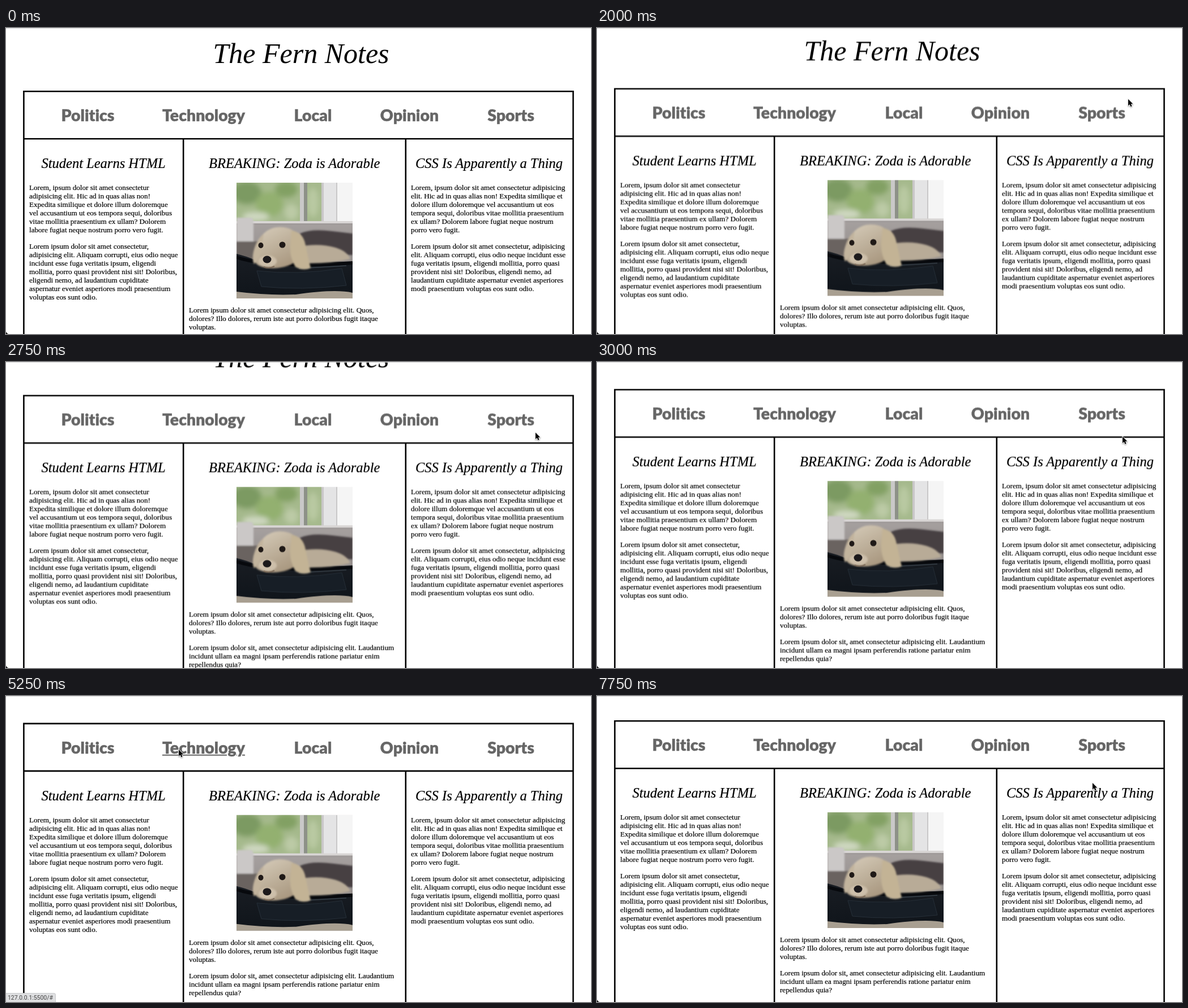
Animation, 1033 px wide and 542 px high, one loop 8000 ms. Source, as an HTML page:

```html
<!DOCTYPE html>
<html lang="en">
<head>
<meta charset="utf-8">
<title>Newspaper page</title>
<style>
html, body { margin: 0; width: 100%; height: 100%; overflow: hidden; background: #fff; }
body { position: relative; color: #000; font: 13.1px/15.1px "Liberation Serif", "Times New Roman", serif; }
#page, #page > *, .cursor, .status, .topline, .corner { position: absolute; }
#page { inset: 0; animation: scroll 8s step-end infinite; }
h1, h2, p { margin: 0; white-space: pre; }
h2, p { -webkit-text-stroke: .2px #000; }

h1 { left: 321px; top: 17px; width: 400px; text-align: center; font: italic 400 50px/56px "Liberation Serif", serif; }
h2 { top: 226px; font: italic 400 24.5px/28px "Liberation Serif", serif; }

.rules { left: 0; top: 0; width: 1033px; height: 700px; fill: none; stroke: #000; stroke-width: 2.6px; }

nav a {
  position: absolute; top: 138px; width: 200px; margin-left: -100px;
  text-align: center; color: #666; font: 900 28.4px/32px Lato, sans-serif;
  font-variant-ligatures: none; -webkit-text-stroke: .4px #666;
}
nav span {
  text-decoration: underline 2px transparent; text-underline-offset: 2px;
  animation: 8s step-end infinite;
}
.politics { animation-name: politics; }
.technology { animation-name: technology; }
.local { animation-name: local; }
.opinion { animation-name: opinion; }
.sports { animation-name: sports; }

.a { left: 41px; }
.b { left: 323px; }
.c { left: 715px; }
.first { top: 274.8px; }
.second { top: 378.5px; }
.b.first { top: 492.2px; }
.b.second { top: 550.6px; }
.photo { left: 407px; top: 274px; width: 205px; height: 204.5px; }

.topline { left: 0; top: 0; width: 100%; height: 1px; background: #d9d9d9; }
.corner { left: 0; bottom: 0; width: 5px; height: 5px; background: radial-gradient(circle at 100% 0, transparent 4.5px, #000 5.2px); }
.status {
  left: 0; top: 526px; width: 88px; height: 16px; box-sizing: border-box; padding-left: 3px;
  background: #dedfe1; border: solid #c9cacc; border-width: 1px 1px 0 0; border-radius: 0 4px 0 0;
  color: #444; font: 10.4px/16px Roboto, sans-serif; white-space: nowrap;
  visibility: hidden; animation: status 8s step-end infinite;
}
.cursor { left: -2px; top: -2px; width: 14px; height: 20px; animation: move 8s step-end infinite; }

@keyframes scroll {
  0% { transform: translateY(0); }
  21.875% { transform: translateY(-1px); }
  25% { transform: translateY(-4.6px); }
  28.125% { transform: translateY(-16px); }
  31.25% { transform: translateY(-35px); }
  34.375% { transform: translateY(-52.7px); }
  37.5% { transform: translateY(-63.3px); }
  96.875%, 100% { transform: translateY(-68px); }
}
@keyframes politics { 53.125% { text-decoration-color: #666; } 62.5% { text-decoration-color: transparent; } }
@keyframes technology { 65.625% { text-decoration-color: #666; } 71.875% { text-decoration-color: transparent; } }
@keyframes local { 75% { text-decoration-color: #666; } 78.125% { text-decoration-color: transparent; } }
@keyframes opinion { 81.25% { text-decoration-color: #666; } 84.375% { text-decoration-color: transparent; } }
@keyframes sports { 84.375% { text-decoration-color: #666; } 90.625% { text-decoration-color: transparent; } }
@keyframes status { 0% { visibility: hidden; } 56.25% { visibility: visible; } 93.75%, 100% { visibility: hidden; } }
@keyframes move {
  0% { transform: translate(1050px, 240px); }
  9.375% { transform: translate(970px, 212px); }
  12.5% { transform: translate(948px, 152px); }
  15.625% { transform: translate(939px, 128px); }
  18.75% { transform: translate(938px, 126px); }
  34.375% { transform: translate(935px, 125px); }
  37.5% { transform: translate(928px, 132px); }
  40.625% { transform: translate(690px, 330px); }
  43.75% { transform: translate(250px, 402px); }
  46.875% { transform: translate(43px, 240px); }
  50% { transform: translate(131px, 98px); }
  53.125% { transform: translate(128px, 88px); }
  56.25% { transform: translate(130px, 93px); }
  59.375% { transform: translate(150px, 94px); }
  62.5% { transform: translate(215px, 96px); }
  65.625% { transform: translate(305px, 95px); }
  68.75% { transform: translate(380px, 95px); }
  71.875% { transform: translate(460px, 93px); }
  75% { transform: translate(542px, 90px); }
  78.125% { transform: translate(630px, 89px); }
  81.25% { transform: translate(730px, 91px); }
  84.375% { transform: translate(888px, 93px); }
  87.5% { transform: translate(887px, 97px); }
  90.625% { transform: translate(881px, 122px); }
  93.75% { transform: translate(876px, 148px); }
  96.875%, 100% { transform: translate(875px, 154px); }
}
</style>
</head>
<body>
<div id="page">
  <h1>The Fern Notes</h1>
  <svg class="rules" viewBox="0 0 1033 700">
    <path d="M31.4 720V112.2H1001.5V720M31.4 196.2H1001.5M313.2 196.2V720M705.8 196.2V720"/>
  </svg>
  <nav>
    <a style="left:144.5px"><span class="politics">Politics</span></a>
    <a style="left:349px"><span class="technology">Technology</span></a>
    <a style="left:542px"><span class="local">Local</span></a>
    <a style="left:712.5px"><span class="opinion">Opinion</span></a>
    <a style="left:891.5px"><span class="sports">Sports</span></a>
  </nav>

  <h2 style="left:62.5px">Student Learns HTML</h2>
  <p class="a first">Lorem, ipsum dolor sit amet consectetur
adipisicing elit. Hic ad in quas alias non!
Expedita similique et dolore illum doloremque
vel accusantium ut eos tempora sequi, doloribus
vitae mollitia praesentium ex ullam? Dolorem
labore fugiat neque nostrum porro vero fugit.</p>
  <p class="a second">Lorem ipsum dolor sit amet consectetur,
adipisicing elit. Aliquam corrupti, eius odio neque
incidunt esse fuga veritatis ipsum, eligendi
mollitia, porro quasi provident nisi sit! Doloribus,
eligendi nemo, ad laudantium cupiditate
aspernatur eveniet asperiores modi praesentium
voluptas eos sunt odio.</p>

  <h2 style="left:358px">BREAKING: Zoda is Adorable</h2>
  <svg class="photo" viewBox="0 0 205 204.5">
    <defs>
      <filter id="soft"><feGaussianBlur stdDeviation="5"/></filter>
      <filter id="fuzz"><feGaussianBlur stdDeviation="1.4"/></filter>
      <linearGradient id="wall" x1="0" y1="0" x2="0" y2="1">
        <stop offset="0" stop-color="#b9b4b3"/><stop offset="1" stop-color="#827c7a"/>
      </linearGradient>
      <linearGradient id="fur" x1="0" y1="0" x2=".6" y2="1">
        <stop offset="0" stop-color="#d8cebc"/><stop offset="1" stop-color="#a99880"/>
      </linearGradient>
      <linearGradient id="bag" x1="0" y1="0" x2="0" y2="1">
        <stop offset="0" stop-color="#191d23"/><stop offset="1" stop-color="#10151b"/>
      </linearGradient>
    </defs>
    <rect width="205" height="205" fill="url(#wall)"/>
    <rect width="151" height="69" fill="#a5b98c"/>
    <g filter="url(#soft)">
      <ellipse cx="18" cy="18" rx="26" ry="20" fill="#7c9a62"/>
      <ellipse cx="58" cy="38" rx="24" ry="22" fill="#93b06f"/>
      <ellipse cx="88" cy="12" rx="20" ry="14" fill="#82a063"/>
      <ellipse cx="34" cy="60" rx="24" ry="8" fill="#cfd8c1"/>
      <ellipse cx="97" cy="52" rx="12" ry="14" fill="#bccaa6"/>
      <ellipse cx="135" cy="35" rx="10" ry="26" fill="#b9c9a2"/>
    </g>
    <rect x="112" width="7" height="69" fill="#c9c8c8"/>
    <rect x="119" width="6" height="69" fill="#8d9188"/>
    <rect x="150" width="28" height="70" fill="#c9c7c8"/>
    <rect x="154" width="22" height="69" fill="#e4e4e5"/>
    <rect x="178" width="27" height="70" fill="#f5f5f5"/>
    <rect y="68" width="205" height="4" fill="#d8d5d4"/>
    <rect y="72" width="205" height="3" fill="#a09b9a"/>
    <g filter="url(#fuzz)">
      <path d="M0 62h24q6 0 6 8v36H0z" fill="#cbc8c7"/>
      <path d="M0 104h42v40H0z" fill="#6a6461"/>
      <path d="M112 90q20-9 58-4l35 4v38h-93z" fill="#464143"/>
    </g>
    <path d="M0 126q14 3 36 12l170 2v60H0z" fill="url(#bag)"/>
    <path d="M0 132q60 20 205 10" fill="none" stroke="#07090d" stroke-width="6"/>
    <path d="M36 156q70 8 150-4l8 30q-80 9-150 2z" fill="#171e26" stroke="#262f38"/>
    <path d="M110 152l84-5" fill="none" stroke="#39424a" stroke-width="1.5"/>
    <g filter="url(#fuzz)">
      <path d="M105 114q40-8 70 1 20 6 26 20-40 10-96 7z" fill="#b8ab97"/>
      <path d="M48 90q14-14 36-11 24 3 31 28 2 30-24 40-20 7-42 3-17-3-19-17 0-26 18-43z" fill="url(#fur)"/>
      <path d="M97 85q21 2 25 26 5 25 9 40-13 6-27-2-10-17-9-36z" fill="#c3b395"/>
      <path d="M48 91q-12 8-18 31-3 14 1 22 9-7 13-25z" fill="#c2b49d"/>
      <ellipse cx="55" cy="139" rx="16" ry="10" fill="#cdbfaa"/>
    </g>
    <ellipse cx="43" cy="111" rx="4.5" ry="5" fill="#1f1917"/>
    <circle cx="81" cy="110" r="5.5" fill="#1f1917"/>
    <ellipse cx="54" cy="136" rx="7.5" ry="6.5" fill="#1c191b"/>
    <path d="M48 149q9 4 19-1" fill="none" stroke="#7d6b59" stroke-width="2"/>
    <path d="M0 193q55 7 105 5 70-10 100-3v10H0z" fill="#a89f91"/>
  </svg>
  <p class="b first">Lorem ipsum dolor sit amet consectetur adipisicing elit. Quos,
dolores? Illo dolores, rerum iste aut porro doloribus fugit itaque
voluptas.</p>
  <p class="b second">Lorem ipsum dolor sit, amet consectetur adipisicing elit. Laudantium
incidunt ullam ea magni ipsam perferendis ratione pariatur enim
repellendus quia?</p>

  <h2 style="left:723px">CSS Is Apparently a Thing</h2>
  <p class="c first">Lorem, ipsum dolor sit amet consectetur adipisicing
elit. Hic ad in quas alias non! Expedita similique et
dolore illum doloremque vel accusantium ut eos
tempora sequi, doloribus vitae mollitia praesentium
ex ullam? Dolorem labore fugiat neque nostrum
porro vero fugit.</p>
  <p class="c second">Lorem ipsum dolor sit amet consectetur, adipisicing
elit. Aliquam corrupti, eius odio neque incidunt esse
fuga veritatis ipsum, eligendi mollitia, porro quasi
provident nisi sit! Doloribus, eligendi nemo, ad
laudantium cupiditate aspernatur eveniet asperiores
modi praesentium voluptas eos sunt odio.</p>
</div>
<div class="topline"></div>
<div class="corner"></div>
<div class="status">127.0.0.1:5500/#</div>
<svg class="cursor" viewBox="-2 -2 14 20">
  <path d="M0 0V11.8L2.7 9.3 4.5 13.4 6.5 12.6 4.8 8.6H8.4Z" fill="#000" stroke="#fff" stroke-width="1.6" paint-order="stroke" stroke-linejoin="round" style="filter:drop-shadow(0 1px .8px #0006)"/>
</svg>
</body>
</html>
```
